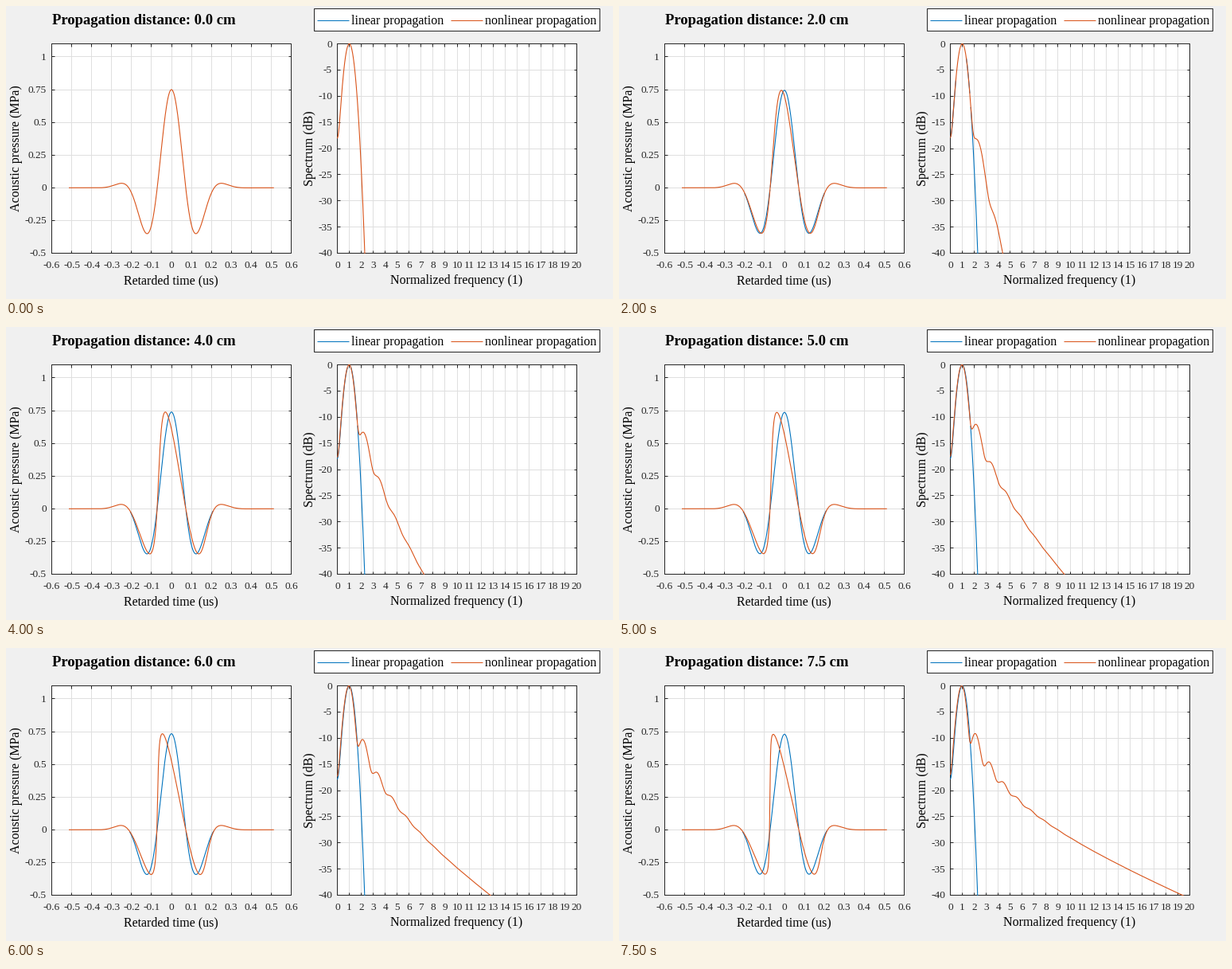
Recreate the animation shown at these times as a matplotlib script. Size 763 px wide and 368 px high, loop 8000 ms.

```python
import numpy as np
import matplotlib.pyplot as plt
from matplotlib.animation import FuncAnimation
from matplotlib.patches import Rectangle

W, H, DPI = 763, 368, 64
PT = 72 / DPI  # points per pixel
INK, GRID, BLUE, ORANGE = "#262626", "#dfdfdf", "#0072BD", "#D95319"
FRAMES, STEP_CM = 16, 0.5

# Pulse and medium (us, MHz, MPa, cm)
F0, P0 = 3.5, 0.75
N, DT = 1024, 1e-3
ABSORB = 2.5e-4                            # Np / cm / MHz^2
KAPPA = 3.5 / (1000 * 1490**3) * 1e10      # beta / (rho c^3), us / MPa / cm
SUBSTEPS = 60

t = (np.arange(N) - N // 2) * DT
freq = np.fft.rfftfreq(N, DT)
ddt = 2j * np.pi * freq
width = 0.5291 / F0
pulse = P0 * np.cos(2 * np.pi * F0 * t) * np.exp(-(t / width) ** 2)


def damp(p, dz):
    return np.fft.irfft(np.fft.rfft(p) * np.exp(-ABSORB * freq**2 * dz), N)


def steepen(p):
    return KAPPA / 2 * np.fft.irfft(ddt * np.fft.rfft(p * p), N)


def advance(p, dz):
    """One split step: half absorption, RK4 steepening, half absorption."""
    p = damp(p, dz / 2)
    k1 = steepen(p)
    k2 = steepen(p + dz / 2 * k1)
    k3 = steepen(p + dz / 2 * k2)
    k4 = steepen(p + dz * k3)
    return damp(p + dz / 6 * (k1 + 2 * k2 + 2 * k3 + k4), dz / 2)


def propagate():
    waves, p = [], pulse
    for i in range(FRAMES):
        waves.append((damp(pulse, i * STEP_CM), p))
        for _ in range(SUBSTEPS):
            p = advance(p, STEP_CM / SUBSTEPS)
    return waves


PAD = 16 * N
norm_freq = np.fft.rfftfreq(PAD, DT) / F0
shown = norm_freq <= 20.2


def spectrum(p):
    mag = np.abs(np.fft.rfft(p, PAD))
    return 20 * np.log10(mag / mag.max() + 1e-9)[shown]


class Panel:
    """Chart box in stage pixels with its own data range and two curves."""

    top, bottom = 47.5, 310.5

    def __init__(self, left, right, xlim, ylim):
        self.left, self.right, self.xlim, self.ylim = left, right, xlim, ylim
        w, h = right - left, self.bottom - self.top
        area = Rectangle((left - 0.5, self.top - 0.5), w + 1, h + 1,
                         fc="white", ec="none", zorder=0)
        ax.add_patch(area)
        frame(left, self.top, w, h, fc="none")
        self.linear, self.nonlinear = (
            ax.plot([], [], color=c, lw=1.1 * PT, zorder=5)[0]
            for c in (BLUE, ORANGE))
        for c in (self.linear, self.nonlinear):
            c.set_clip_path(area)

    def x(self, v):
        a, b = self.xlim
        return self.left + (np.asarray(v) - a) / (b - a) * (self.right - self.left)

    def y(self, v):
        a, b = self.ylim
        return self.bottom - (np.asarray(v) - a) / (b - a) * (self.bottom - self.top)

    def axes(self, xticks, yticks, xlabel, ylabel, ybase):
        for v in xticks:
            px = self.x(v)
            rule([px, px], [self.top, self.bottom], GRID, 1)
            rule([px, px], [self.bottom, self.bottom - 3])
            rule([px, px], [self.top, self.top + 4])
            label(px, 329, f"{v:g}", 13.33, ha="center", color=INK)
        for v in yticks:
            py = self.y(v)
            rule([self.left, self.right], [py, py], GRID, 1)
            rule([self.left, self.left + 4], [py, py])
            rule([self.right, self.right - 3], [py, py])
            label(self.left - 6.5, py + 4, f"{v:g}", 13.33, ha="right", color=INK)
        label((self.left + self.right) / 2 - 0.5, 349, xlabel, 16, ha="center")
        label(ybase, (self.top + self.bottom) / 2, ylabel, 16, ha="center",
              rotation=90, rotation_mode="anchor")

    def plot(self, xs, linear, nonlinear):
        px, under, over = self.x(xs), self.y(linear), self.y(nonlinear)
        # Leave out the lower curve where the upper one covers it
        covered = np.abs(under - over) < 0.5
        self.linear.set_data(px, np.where(covered, np.nan, under))
        self.nonlinear.set_data(px, over)


def rule(xs, ys, color=INK, z=4):
    """Straight one-pixel line lying on whole pixels."""
    ax.plot(np.floor(xs), np.floor(ys), color=color, lw=PT, zorder=z,
            solid_capstyle="butt")


def frame(x, y, w, h, fc):
    ax.add_patch(Rectangle((np.floor(x), np.floor(y)), w, h, fc=fc, ec=INK,
                           lw=PT, zorder=4))


def label(x, y, s, px, **kw):
    return ax.text(x, y, s, fontsize=px * PT, va="baseline", zorder=6, **kw)


plt.rcParams["font.family"] = "Liberation Serif"
fig = plt.figure(figsize=(W / DPI, H / DPI), dpi=DPI, facecolor="#f0f0f0")
ax = fig.add_axes([0, 0, 1, 1])
ax.set_axis_off()

wave = Panel(57.5, 358.5, (-0.6, 0.6), (-0.5, 1.1))
wave.axes(np.round(np.arange(-6, 7) / 10, 1), np.arange(-2, 5) / 4,
          "Retarded time (us)", "Acoustic pressure (MPa)", 17)
spec = Panel(416.5, 717.5, (0, 20), (-40, 0))
spec.axes(range(21), range(-40, 1, 5),
          "Normalized frequency (1)", "Spectrum (dB)", 386)

frame(387.5, 3.5, 359, 28, fc="white")
for x, color, name in ((391.5, BLUE, "linear propagation"),
                       (559.5, ORANGE, "nonlinear propagation")):
    rule([x, x + 40], [18.5, 18.5], color, 5)
    label(x + 42.5, 23, name, 16)

title = label(57.5, 23, "", 18.67, weight="bold")
ax.set_xlim(0, W)
ax.set_ylim(H, 0)

waves = propagate()


def draw(i):
    title.set_text(f"Propagation distance: {i * STEP_CM:.1f} cm")
    linear, nonlinear = waves[i]
    wave.plot(t, linear, nonlinear)
    spec.plot(norm_freq[shown], spectrum(linear), spectrum(nonlinear))
    return [title, wave.linear, wave.nonlinear, spec.linear, spec.nonlinear]


anim = FuncAnimation(fig, draw, frames=FRAMES, interval=500, repeat=True,
                     repeat_delay=0, blit=False)
plt.show()
```
